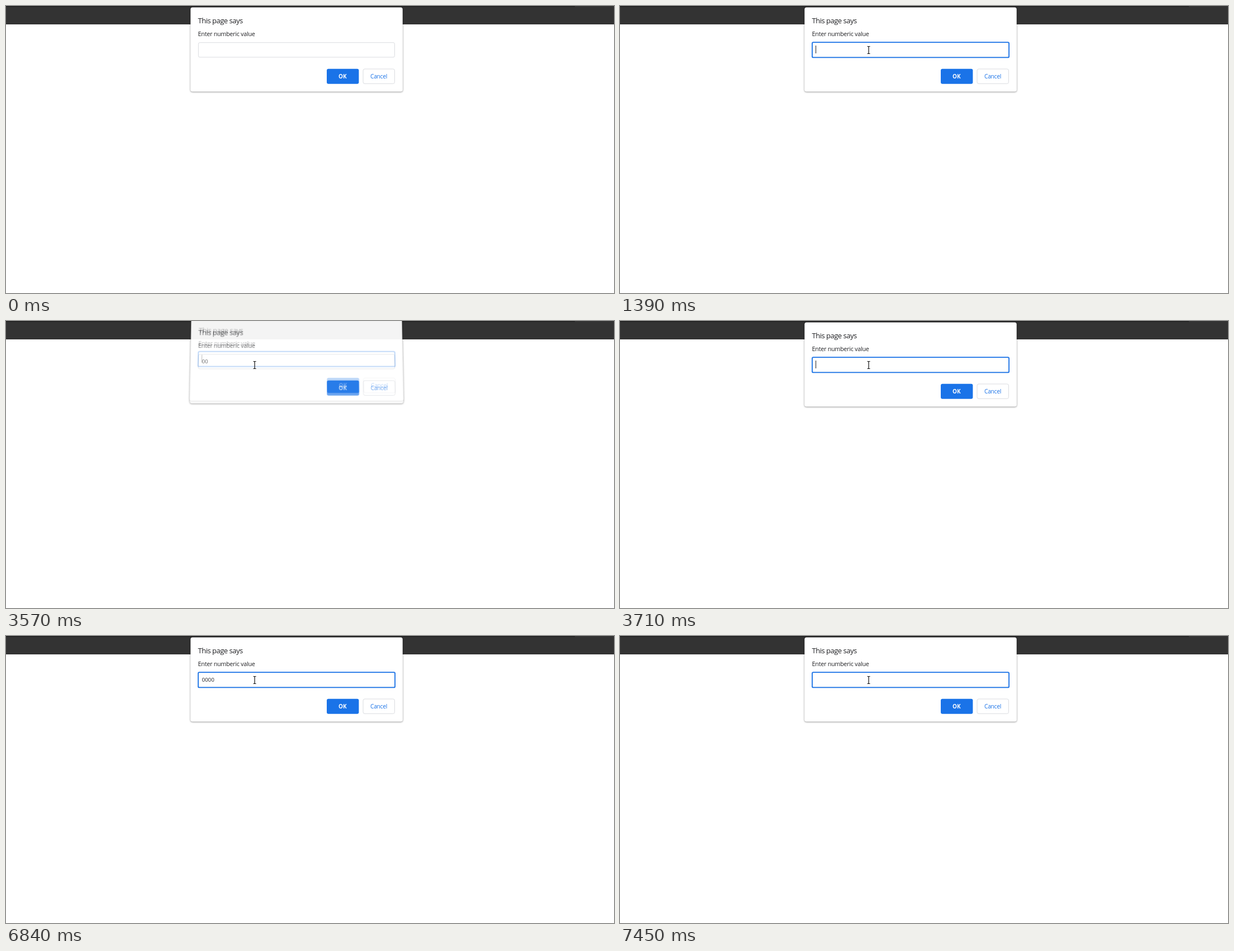
These frames come from a looping animation (1088x515 px, 8 s). An HTML page:

```html
<!DOCTYPE html>
<html lang="en">
<head>
<meta charset="utf-8">
<title>Prompt dialog</title>
<style>
  html, body { margin: 0; width: 100%; height: 100%; overflow: hidden; background: #fff; }
  svg { position: absolute; left: 0; top: 0; width: 1088px; height: 515px; overflow: hidden; }
  .dialog { transform-origin: 520px 78px; }
  text { font-family: "Open Sans", "Noto Sans", sans-serif; fill: #202124; }
  .title { font-size: 12.9px; letter-spacing: -.46px; }
  .label { font-size: 10.7px; letter-spacing: -.23px; }
  .value { font-size: 9.8px; }
  .ok { font-size: 10px; font-weight: 700; fill: #fff; text-anchor: middle; }
  .cancel { font-size: 10.2px; font-weight: 500; letter-spacing: -.25px; fill: #1a73e8; text-anchor: middle; }
  .outline { fill: #fff; stroke: #dadce0; }
  .focus { fill: none; stroke: #1a73e8; stroke-width: 1.8; }
</style>
</head>
<body>
<svg viewBox="0 0 1088 515">
  <defs>
    <filter id="shadow" x="-5%" y="-10%" width="110%" height="120%">
      <feDropShadow dx="0" dy="1" stdDeviation="1.6" flood-color="#000" flood-opacity=".5"/>
    </filter>
  </defs>
  <rect width="1088" height="33" fill="#333"/>
  <rect width="1018" height="1.5" fill="#1e1e1e"/>
</svg>
<div id="dialogs"></div>
<svg viewBox="0 0 1088 515">
  <path id="arrow" d="M.5 .5V14.2L3.7 11.2L5.8 16L8 15L5.9 10.4H10.3Z" fill="#fff" stroke="#000" stroke-width=".9"/>
  <path id="beam" d="M-2.5 -6.5H-1Q0 -6.5 0 -5.5Q0 -6.5 1 -6.5H2.5M0 -5.5V5.5M-2.5 6.5H-1Q0 6.5 0 5.5Q0 6.5 1 6.5H2.5" fill="none" stroke="#111" stroke-width="1.2"/>
</svg>
<script>
const LOOP = 8000;

// [time, x, y, shape]
const pointerSteps = [
  [0, 0, 0, ''],
  [70, 737, 340, 'arrow'], [150, 660, 253, 'arrow'],
  [540, 640, 238, 'arrow'], [620, 520, 160, 'arrow'],
  [700, 435, 108, 'arrow'], [770, 442, 101, 'arrow'],
  [950, 442, 95, 'arrow'], [1020, 445, 82, 'beam'], [1090, 445, 79, 'beam']
];

// [time, focused, digits typed, caret shown]
const inputSteps = [
  [0, false, 0, false],
  [1390, true, 0, true], [1940, true, 0, false], [2480, true, 0, true],
  [2800, true, 1, true], [2950, true, 2, true],
  [3490, true, 0, true], [4030, true, 0, false], [4550, true, 0, true],
  [5120, true, 0, false], [5200, true, 1, true], [5450, true, 2, true],
  [5670, true, 3, true], [6220, true, 3, false], [6320, true, 4, true],
  [6840, true, 4, false], [6950, true, 0, true], [7450, true, 0, false]
];

// [time, closing lift, closing opacity, opening lift, opening opacity, closing digits]
const swapSteps = [
  [0, 0, 0, 0, 1, 0],
  [3490, 1, 1, 11, 0, 2], [3570, 6, .92, 10.5, .3, 2],
  [3640, 12, .1, 4, .85, 2], [3710, 0, 0, 0, 1, 0],
  [6950, 4, .97, 11, .12, 4], [7020, 9, .38, 7.5, .6, 4],
  [7090, 12, 0, 2, .95, 4], [7160, 0, 0, 0, 1, 0]
];

const current = (steps, t) => steps.findLast(step => step[0] <= t);
const show = (node, on) => node.setAttribute('visibility', on ? 'inherit' : 'hidden');

function createDialog() {
  const holder = document.createElement('div');
  holder.innerHTML = `<svg class="dialog" viewBox="0 0 1088 515">
    <rect x="330.3" y="2.5" width="379.4" height="150.7" rx="3.5" fill="#fff" filter="url(#shadow)"/>
    <text class="title" x="343.6" y="30.7">This page says</text>
    <text class="label" x="343.6" y="54">Enter numberic value</text>
    <rect class="outline" x="344.3" y="65.7" width="351.2" height="26.2" rx="2.5"/>
    <rect class="focus" x="343.9" y="65.2" width="352.2" height="27.2" rx="2"/>
    <text class="value" x="350.4" y="82"></text>
    <rect class="caret" y="71" width="1" height="14" fill="#222"/>
    <rect x="574" y="112.7" width="57.4" height="27" rx="3" fill="#1a73e8"/>
    <text class="ok" x="602.3" y="129.7">OK</text>
    <rect class="outline" x="639" y="113" width="56.5" height="26.4" rx="3"/>
    <text class="cancel" x="667" y="129.7">Cancel</text>
  </svg>`;
  const svg = holder.firstChild;
  document.getElementById('dialogs').append(svg);
  const find = name => svg.querySelector('.' + name);
  return { svg, focus: find('focus'), value: find('value'), caret: find('caret') };
}

function updateDialog(dialog, lift, opacity, focused, digits, caret) {
  const { svg } = dialog;
  svg.style.visibility = opacity ? 'visible' : 'hidden';
  svg.style.opacity = opacity;
  svg.style.transform = lift
    ? `translateY(${-lift}px) perspective(1000px) rotateX(${lift * .8}deg)`
    : 'none';
  show(dialog.focus, focused);
  dialog.value.textContent = '0'.repeat(digits);
  dialog.caret.setAttribute('x', Math.round(350 + 5.6 * digits));
  show(dialog.caret, caret);
}

const closing = createDialog();
const opening = createDialog();
const pointers = ['arrow', 'beam'].map(id => document.getElementById(id));

function render(t) {
  const [, x, y, shape] = current(pointerSteps, t);
  for (const pointer of pointers) {
    show(pointer, pointer.id === shape);
    pointer.setAttribute('transform', `translate(${x} ${y})`);
  }
  const [, focused, digits, caret] = current(inputSteps, t);
  const [, outLift, outOpacity, inLift, inOpacity, outDigits] = current(swapSteps, t);
  updateDialog(closing, outLift, outOpacity, false, outDigits, false);
  updateDialog(opening, inLift, inOpacity, focused, digits, caret);
}

const start = performance.now();
function tick() {
  render((performance.now() - start) % LOOP);
  requestAnimationFrame(tick);
}
tick();
</script>
</body>
</html>
```
